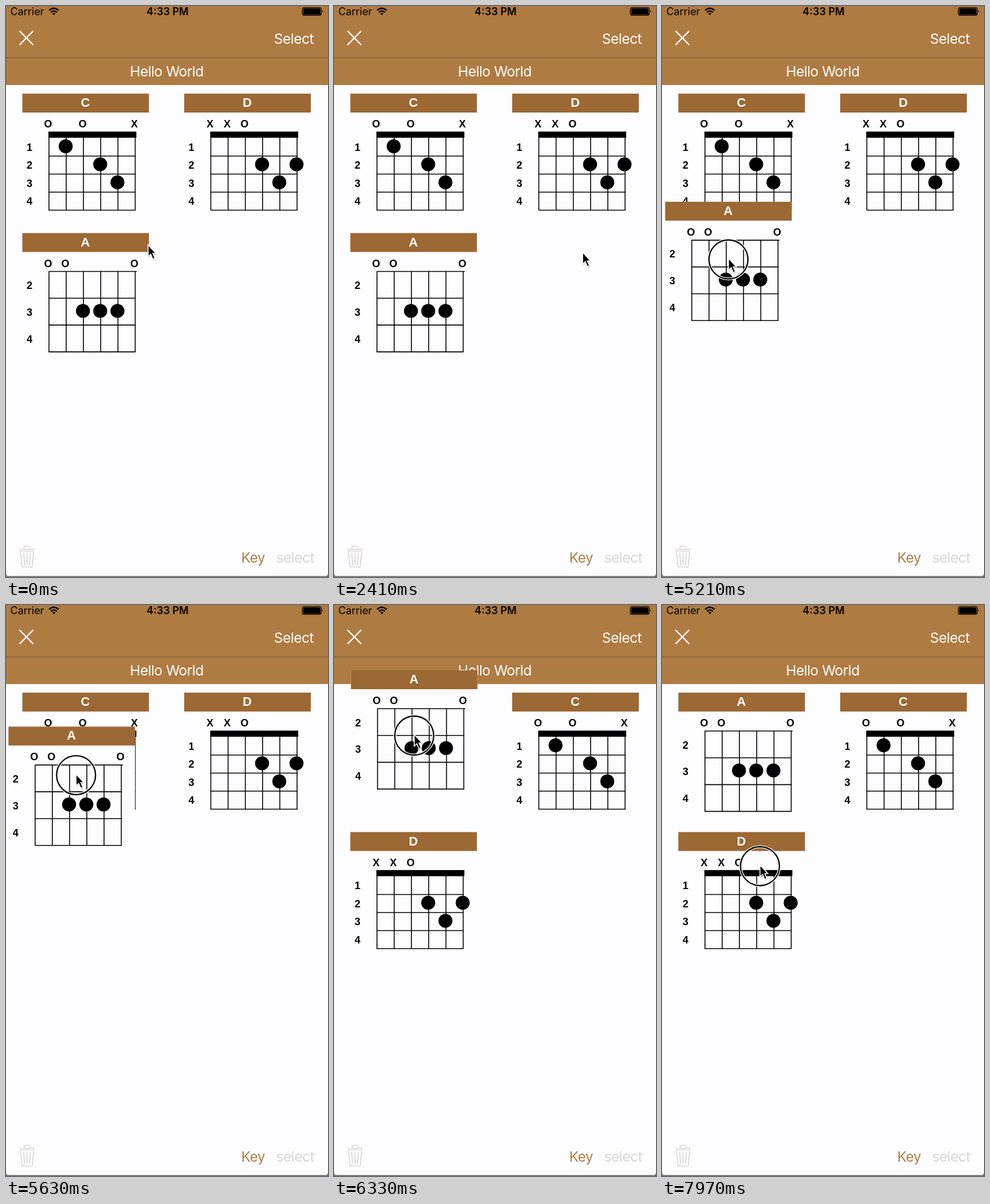
An HTML page for the animation above (7990 ms loop, 562x997 px).

```html
<!DOCTYPE html>
<html lang="en">
<head>
<meta charset="utf-8">
<title>Chord sheet</title>
<style>
  html, body { margin: 0; width: 100%; height: 100%; overflow: hidden; background: #fdfcfe; }
  svg { display: block; width: 100vw; height: 100vh; }
  text { font-family: Inter, Roboto, sans-serif; }
  .nav { font-size: 24.5px; letter-spacing: -.5px; }
  .status { font-size: 18px; }
  .card text { font-family: "Liberation Sans", Arial, sans-serif; font-weight: 700; font-size: 18px; text-anchor: middle; }
  .card .name { font-size: 22px; fill: #fff; }
  .card line { stroke: #000; stroke-width: 1.6; }
</style>
</head>
<body>
<svg viewBox="0 0 562 997">
  <rect width="562" height="997" fill="#fdfcfe"/>
  <rect y="995.3" width="562" height="2" fill="#77727a"/>
  <path d="M0 991V997H6Q1 996 0 991ZM562 991V997H556Q561 996 562 991Z" fill="#77727a"/>

  <rect width="562" height="138" fill="#ae7b42"/>
  <rect y="90" width="562" height="1.2" fill="#80603c"/>
  <text class="status" x="7.5" y="16">Carrier</text>
  <text class="status" x="282" y="16" text-anchor="middle" font-weight="600">4:33 PM</text>
  <g fill="none" stroke="#000" stroke-width="2.4">
    <path d="M75.2 7.6Q83.5 .2 91.8 7.6M78.2 11Q83.5 6.3 88.8 11"/>
    <path d="M80.8 13.2Q83.5 10.8 86.2 13.2L83.5 16Z" fill="#000" stroke="none"/>
  </g>
  <rect x="517.2" y="2.7" width="33" height="13.6" rx="3" fill="none" stroke="#000" stroke-width="1.2"/>
  <rect x="518.7" y="4" width="30" height="11.2" rx="1.8"/>
  <path d="M551.6 7Q554 9.5 551.6 12Z"/>
  <path d="M23.5 43.5L47.5 68M47.5 43.5L23.5 68" stroke="#fff" stroke-width="2.4"/>
  <text class="nav" x="537" y="66" text-anchor="end" fill="#fff">Select</text>
  <text class="nav" x="280.5" y="123" text-anchor="middle" fill="#fff">Hello World</text>

  <g fill="none" stroke="#d8d6d3" stroke-width="1.6">
    <path d="M23 948.5H50.5M31.5 948V943.5H42V948M25 951.5L28 979.5H45.5L48.5 951.5Z"/>
    <path d="M31 955L32.5 976M36.7 955V976M42.5 955L41 976"/>
  </g>
  <text class="nav" x="410.5" y="971.5" fill="#ae804a">Key</text>
  <text class="nav" x="538" y="971.5" text-anchor="end" fill="#d8d6d4">select</text>

  <g id="cards"></g>

  <g id="touch" fill="none">
    <circle r="34" stroke="#fff" stroke-width="5"/>
    <circle r="34" stroke="#000" stroke-width="2.3"/>
  </g>
  <g id="cursor">
    <path d="M1 2V22.5L5.5 18.5L9.3 27L13.2 25.3L9.4 17H15Z" fill="#000" opacity=".22"/>
    <path d="M0 0V20.5L4.6 16.4L8.3 25L12 23.4L8.3 15H13.8Z" stroke="#fff" stroke-width="1.6"/>
  </g>
</svg>
<script>
const LOOP = 7990;
const CARD = { w: 221, h: 228 };
const SLOTS = [[28.5, 153], [311, 153], [28.5, 396.5]];
const PICK = 5030, SHIFT = 5777, DROP = 6715, MOVE = 300;
const LAG = 80;
const PRESSES = [[3390, DROP], [7880, LOOP]];

// Pointer path: time, x, y
const PATH = [
  [0, 248, 419], [700, 250, 420], [1800, 430, 430], [2410, 434, 432],
  [2600, 425, 434], [3300, 118, 460], [3450, 116, 461], [5100, 116, 461],
  [5220, 116, 441], [5500, 110, 345], [5820, 140, 228], [DROP, 140, 228],
  [6880, 255, 337], [7150, 270, 380], [7750, 175, 452], [7880, 171, 456], [LOOP, 171, 456]
];

// marks and dots are indexed by string; dots also hold the fret row
const CHORDS = {
  D: { first: 1, marks: { 0: "X", 1: "X", 2: "O" }, dots: [[3, 1], [5, 1], [4, 2]] },
  C: { first: 1, marks: { 0: "O", 2: "O", 5: "X" }, dots: [[1, 0], [3, 1], [4, 2]] },
  A: { first: 2, marks: { 0: "O", 1: "O", 5: "O" }, dots: [[2, 1], [3, 1], [4, 1]] }
};

const byId = id => document.getElementById(id);
const clamp = v => Math.max(0, Math.min(1, v));
const ease = v => { v = clamp(v); return v * v * (3 - 2 * v); };
const mix = (a, b, k) => a.map((v, i) => v + (b[i] - v) * k);

function line(x1, y1, x2, y2) {
  return `<line x1="${x1}" y1="${y1}" x2="${x2}" y2="${y2}"/>`;
}

function label(x, y, text, cls = "") {
  return `<text class="${cls}" x="${x}" y="${y}">${text}</text>`;
}

function chordCard(name, { first, marks, dots }) {
  const open = first === 1;
  const rows = open ? 4 : 3;
  const step = open ? 31.5 : 46.8;
  const top = open ? 77.5 : 67;
  const bottom = top + rows * step;
  const stringX = i => 46.5 + 30.1 * i;
  let out = `<rect width="${CARD.w}" height="${CARD.h}" fill="#fdfcfe"/>` +
    `<rect width="${CARD.w}" height="33" fill="#9c6833"/>` + label(110, 23, name, "name");
  out += open ? `<rect x="45.5" y="66.3" width="153.5" height="10.7"/>` : line(46, top, 199.5, top);
  for (let i = 0; i < 6; i++) out += line(stringX(i), 67, stringX(i), bottom);
  for (let r = 0; r < rows; r++) {
    const y = top + step * (r + 1);
    out += line(45.7, y, 197.8, y);
    out += label(12.5, y - step / 2 + (open ? 6.4 : 7.2), first + r);
  }
  for (const i in marks) out += label(45 + 30.1 * i, 59, marks[i]);
  for (const [s, r] of dots) {
    out += `<circle cx="${stringX(s) - .9}" cy="${top + step * (r + .5) - 1.3}" r="12.2"/>`;
  }
  return `<g class="card" id="card${name}">${out}</g>`;
}

byId("cards").innerHTML = Object.entries(CHORDS).map(([n, c]) => chordCard(n, c)).join("");

function pointer(t) {
  const i = Math.max(1, PATH.findIndex(p => p[0] >= t));
  const [t0, ...a] = PATH[i - 1], [t1, ...b] = PATH[i];
  return mix(a, b, (t - t0) / (t1 - t0));
}

// The held card trails the finger slightly
function held(t) {
  const [x, y] = pointer(Math.max(0, t - LAG));
  return [x - CARD.w / 2, y - CARD.h / 2];
}

function place(el, [x, y]) {
  el.setAttribute("transform", `translate(${x.toFixed(2)} ${y.toFixed(2)})`);
}

function draw(t) {
  const shift = ease((t - SHIFT) / MOVE);
  place(byId("cardC"), mix(SLOTS[0], SLOTS[1], shift));
  place(byId("cardD"), mix(SLOTS[1], SLOTS[2], shift));

  const drop = ease((t - DROP) / MOVE);
  const a = byId("cardA");
  place(a, t < DROP
    ? mix(SLOTS[2], held(t), ease((t - PICK) / 150))
    : mix(held(DROP), SLOTS[0], drop));
  a.setAttribute("opacity", 1 - .4 * Math.sin(Math.PI * drop));

  const [x, y] = pointer(t);
  place(byId("cursor"), [x, y - 2]);
  place(byId("touch"), [x, y]);
  const down = PRESSES.some(([from, to]) => t >= from && t < to);
  byId("touch").setAttribute("visibility", down ? "visible" : "hidden");
}

const start = performance.now();
function tick() {
  draw((performance.now() - start) % LOOP);
  requestAnimationFrame(tick);
}
tick();
</script>
</body>
</html>
```
